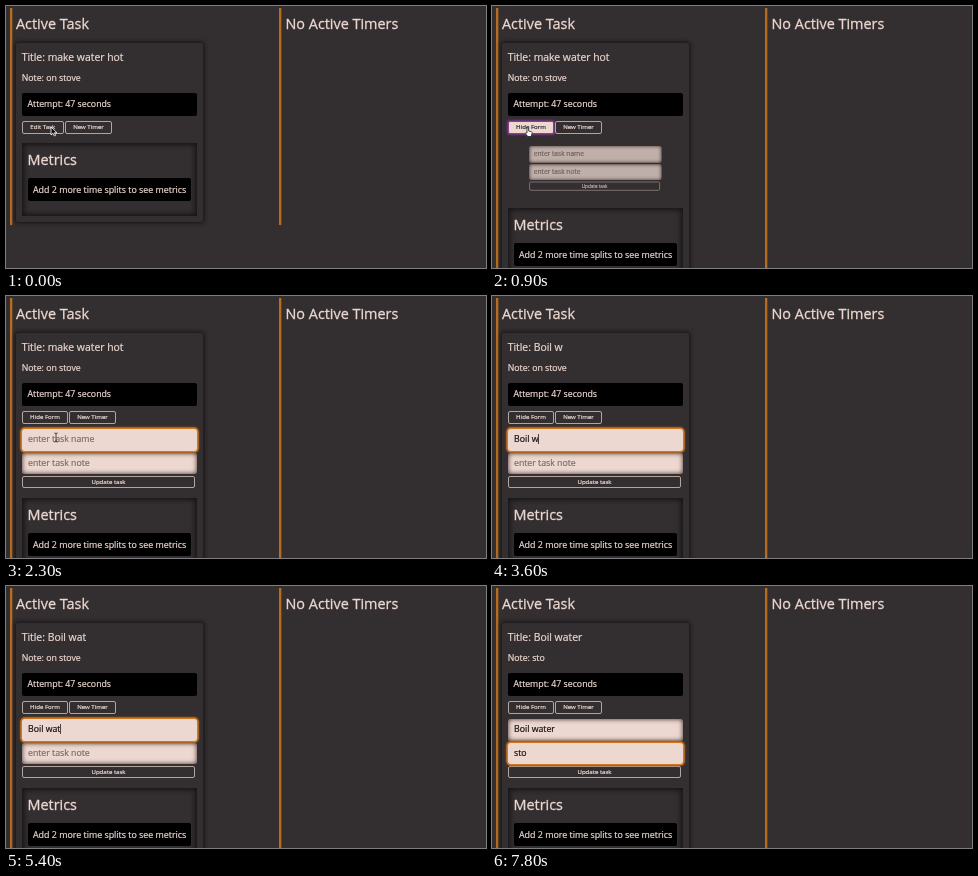
Write an HTML page that moves like this. It is 480 by 262 pixels and loops after 8000 ms.

```html
<!DOCTYPE html>
<html lang="en">
<head>
<meta charset="utf-8">
<title>Active task</title>
<style>
  :root { --bg: #332e30; --pink: #ecd8d0; --orange: #d0781e; --rim: #b3a49e; }
  html, body { margin: 0; width: 100%; height: 100%; overflow: hidden; }
  body { position: relative; background: var(--bg); color: var(--pink);
         font: 8.75px "Open Sans", "Noto Sans", sans-serif; -webkit-text-stroke: .22px; }
  div, span, svg { position: absolute; box-sizing: border-box; }
  /* y is the baseline of the text */
  span { left: calc(var(--x) * 1px); top: calc(var(--y) * 1px - .388em);
         line-height: 0; white-space: pre; }
  .head { font-size: 14.4px; -webkit-text-stroke: .3px; }
  .line { top: 2px; width: 2px; background: #b66d21; box-shadow: .5px 0 1px #8a561f; }
  .card { left: 10px; top: 37px; width: 187px; border-radius: 2px; box-shadow: 0 0 4px 1px #151213; }
  .black { background: #000; border-radius: 2px; }
  .btn { height: 12.5px; border: 1px solid var(--rim); border-radius: 2px;
         font-size: 6.1px; line-height: 10.5px; text-align: center; white-space: nowrap; }
  #toggle { background: rgb(236 216 208 / var(--h));
            color: color-mix(in srgb, #332e30 calc(var(--h) * 100%), #ecd8d0); }
  #toggle.focus { border-color: #8b3d93; box-shadow: 0 0 2px 1px #7b3484; }
  #form { inset: 0; transform-origin: 103px 162px; }
  .field { left: 16px; width: 175px; height: 21.5px; padding-left: 6px; border-radius: 3px;
           background: var(--pink); color: #181516; line-height: 21px; white-space: pre;
           box-shadow: inset 0 0 5px rgb(60 40 40 / var(--shade, 1)); }
  .field.focus { box-shadow: 0 0 0 1.5px var(--orange), 0 0 2px 2px #9a5a1e; z-index: 1; }
  .field i { color: #7b6e6a; font-style: normal; }
  .field b { display: inline-block; width: 1px; height: 10px; margin-right: -1px;
             background: #4a413f; vertical-align: -2px; }
  #metrics { left: 16px; top: 137px; width: 175px; height: 73px; box-shadow: inset 0 0 5px 2px #171415; }
  svg { width: 12px; height: 14px; overflow: visible; z-index: 2; }
</style>
</head>
<body>
<div class="line" style="left:4px"></div>
<div class="line" style="left:273px"></div>
<div class="card"></div>
<span class="head" style="--x:10;--y:23.5">Active Task</span>
<span class="head" style="--x:279.5;--y:23.5">No Active Timers</span>
<span id="title" style="--x:15.7;--y:55.3;font-size:10.4px"></span>
<span id="note" style="--x:15.7;--y:75.8"></span>
<div class="black" style="left:16px;top:87px;width:175px;height:22.5px"></div>
<span style="--x:21.5;--y:101.5">Attempt: 47 seconds</span>
<div class="btn" id="toggle" style="left:16px;top:115px"></div>
<div class="btn" id="timer" style="top:115px;width:47px">New Timer</div>
<div id="form">
  <div class="field" id="task" style="top:133px"></div>
  <div class="field" id="memo" style="top:156.5px"></div>
  <div class="btn" style="left:16px;top:179.5px;width:173px">Update task</div>
</div>
<div id="metrics">
  <span class="head" style="--x:5.5;--y:23">Metrics</span>
  <div class="black" style="left:6px;top:35px;width:163px;height:23px"></div>
  <span style="--x:11;--y:50;font-size:8.9px">Add 2 more time splits to see metrics</span>
</div>
<svg id="cursor"><path stroke-width=".8"/></svg>
<script>
const $ = id => document.getElementById(id);
const ramp = (t, a, b) => Math.min(1, Math.max(0, (t - a) / (b - a)));
const LOOP = 8000;

// [time, number of letters in the field]
const taskKeys = [[1800, 0], [2500, 1], [2600, 2], [2700, 3], [2900, 4], [3100, 5], [3600, 6],
  [4000, 7], [4200, 8], [4300, 9], [4800, 8], [4900, 7], [5100, 6], [5200, 7],
  [5400, 8], [5500, 9], [5700, 10]];
const memoKeys = [[5900, 0], [7100, 1], [7200, 2], [7300, 3]];

const shapes = {
  arrow: "M0 0V8L2 6.3L3.3 9L4.6 8.4L3.4 5.8H6Z",
  hand: "M2 6V1Q2.8 0 3.6 1V4L6.6 4.8Q7.3 5.2 7 6.5L6.2 9.5H2.8L.3 6.4Q.6 5.2 2 6Z",
  beam: "M-1.7 0Q0 0 0 1Q0 0 1.7 0M0 1V8M-1.7 9Q0 9 0 8Q0 9 1.7 9"
};

function typed(text, keys, t) {
  const [since, count] = keys.findLast(k => k[0] <= t) || [0, 0];
  return { text: text.slice(0, count), caret: (t - since) % 1000 < 500 };
}

function drawField(id, state, hint, focus) {
  const caret = focus && state.caret ? "<b></b>" : "";
  $(id).innerHTML = state.text ? state.text + caret : caret + `<i>${hint}</i>`;
  $(id).classList.toggle("focus", focus);
}

function drawCursor(t) {
  let kind = "arrow", x = 45, y = 121;
  if (t >= 1500) {
    kind = "beam";
    x = 46 + 4 * ramp(t, 1500, 1600);
    y = 133 + 4 * ramp(t, 1500, 1600);
  } else if (t >= 1400) {
    [x, y] = [41, 127];
  } else if (t >= 200) {
    kind = "hand";
    x = 45 - 12.5 * ramp(t, 100, 500);
  }
  const path = $("cursor").firstElementChild, beam = kind === "beam";
  path.setAttribute("d", shapes[kind]);
  path.setAttribute("fill", beam ? "none" : kind === "hand" ? "#fff" : "#111");
  path.setAttribute("stroke", beam ? "#222" : kind === "hand" ? "#222" : "#fff");
  $("cursor").style.cssText = `left:${x}px;top:${y}px;display:${t < 2500 ? "block" : "none"}`;
}

function draw(t) {
  const open = t >= 700;
  const task = typed("Boil water", taskKeys, t), memo = typed("sto", memoKeys, t);
  $("title").textContent = "Title: " + (task.text || "make water hot");
  $("note").textContent = "Note: " + (memo.text || "on stove");

  const toggle = $("toggle");
  toggle.textContent = open ? "Hide Form" : "Edit Task";
  toggle.style.width = open ? "46px" : "41.5px";
  toggle.style.setProperty("--h", ramp(t, 100, 500) - ramp(t, 1300, 1600));
  toggle.classList.toggle("focus", open && t < 1800);
  $("timer").style.left = open ? "63px" : "59px";

  const grow = open ? Math.sin(ramp(t, 660, 1100) * Math.PI / 2) : 0;
  $("form").style.transform = `scale(${grow})`;
  $("form").style.opacity = grow;
  const hover = t < 2500 ? ramp(t, 1300, 1600) : 0;
  $("task").style.setProperty("--shade", 1 - hover);
  drawField("task", task, "enter task name", t >= 1800 && t < 5900);
  drawField("memo", memo, "enter task note", t >= 5900);

  const shift = open ? 65 : 0;
  $("metrics").style.top = 137 + shift + "px";
  document.querySelector(".card").style.height = 179 + shift + "px";
  for (const line of document.querySelectorAll(".line")) line.style.height = 217 + shift + "px";
  drawCursor(t);
}

let start, last;
function tick(now) {
  start ??= now;
  const t = Math.floor((now - start) % LOOP / 100) * 100;
  if (t !== last) draw(last = t);
  requestAnimationFrame(tick);
}
draw(0);
requestAnimationFrame(tick);
</script>
</body>
</html>
```
